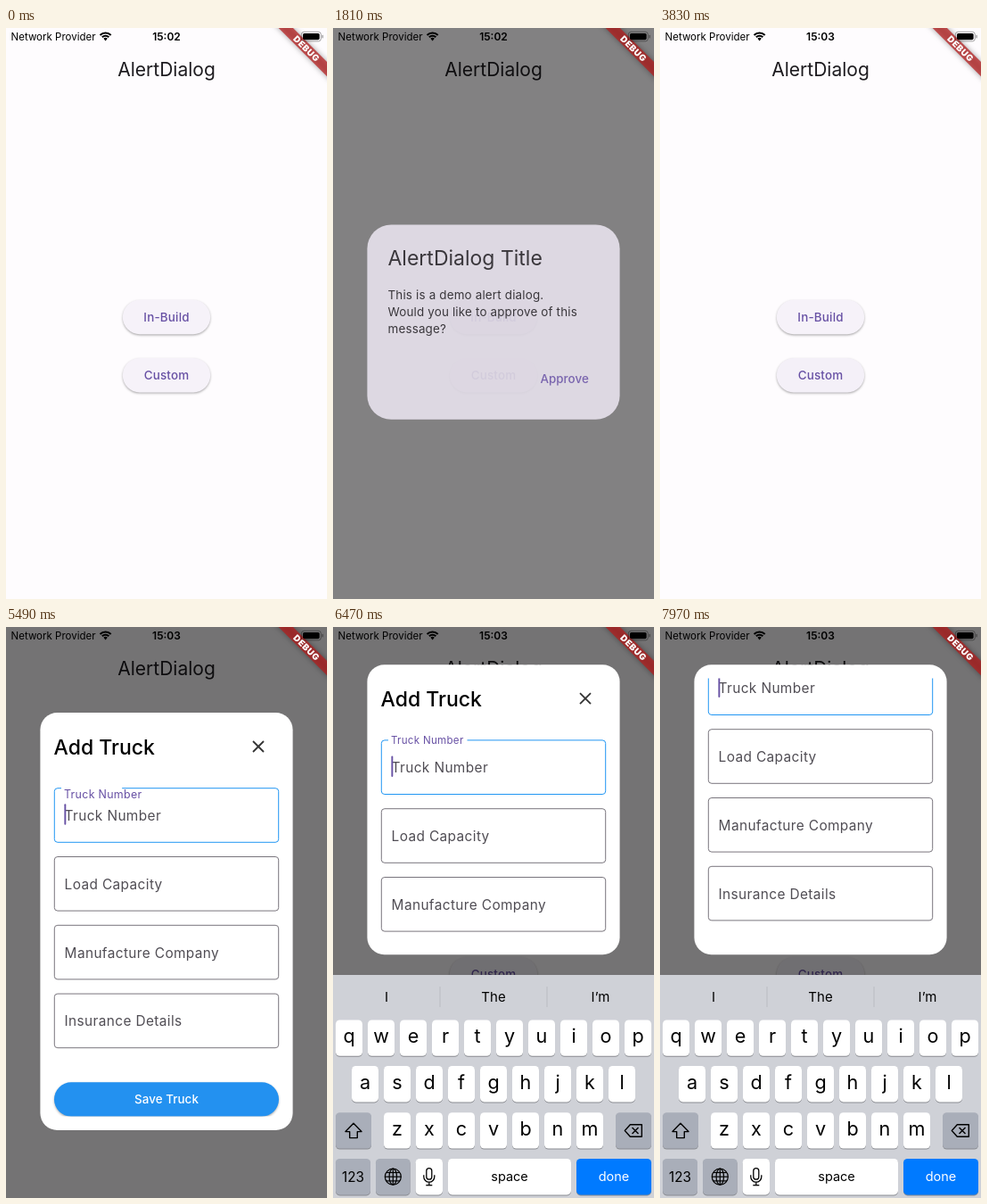
Animation of 360 by 640 pixels, one loop 8000 ms. Source, as an HTML page with a canvas:

```html
<!DOCTYPE html>
<html lang="en">
<head>
<meta charset="utf-8">
<title>Alert dialog demo</title>
<style>
  html, body { margin: 0; width: 100%; height: 100%; overflow: hidden; background: #fefcfe; }
  canvas { display: block; width: 360px; height: 640px; }
</style>
</head>
<body>
<canvas id="stage"></canvas>
<script>
const W = 360, H = 640, LOOP = 8000;
const PURPLE = '#6750a4', BLUE = '#2196f3', INK = '#1d1b1f';
const canvas = document.getElementById('stage');
const ctx = canvas.getContext('2d');
const dpr = window.devicePixelRatio || 1;
canvas.width = W * dpr;
canvas.height = H * dpr;

// ---- helpers ----
const clamp = (v, a = 0, b = 1) => Math.min(b, Math.max(a, v));
const lerp = (a, b, p) => a + (b - a) * p;
const smooth = p => p * p * (3 - 2 * p);

// Value of the last [time, value] pair that has been reached.
function hold(t, keys) {
  let v = 0;
  for (const [at, value] of keys) if (t >= at) v = value;
  return v;
}

function text(str, x, y, size, { color = INK, weight = 400, align = 'left', track = 0 } = {}) {
  ctx.font = `${weight} ${size}px Inter, Roboto, sans-serif`;
  ctx.letterSpacing = track + 'px';
  ctx.textAlign = align;
  ctx.fillStyle = color;
  ctx.fillText(str, x, y);
}

function box(x, y, w, h, r, fill) {
  ctx.beginPath();
  ctx.roundRect(x, y, w, h, r);
  ctx.fillStyle = fill;
  ctx.fill();
}

function line(points, close) {
  ctx.beginPath();
  points.forEach(([x, y], i) => i ? ctx.lineTo(x, y) : ctx.moveTo(x, y));
  if (close) ctx.closePath();
  ctx.stroke();
}

function pen(color, width) {
  ctx.strokeStyle = color;
  ctx.lineWidth = width;
}

function group(draw) {
  ctx.save();
  draw();
  ctx.restore();
}

function shadow(color, blur, dy) {
  ctx.shadowColor = color;
  ctx.shadowBlur = blur * dpr;
  ctx.shadowOffsetY = dy * dpr;
}

function pill(x, y, w, h, fill) {
  group(() => {
    shadow('rgba(0,0,0,.32)', 2.5, 1.2);
    box(x, y, w, h, h / 2, fill);
  });
}

// ---- home page ----
function homeButton(label, cy, press) {
  pill(130.8, cy - 19.2, 98.4, 38.4, '#f6f2f9');
  if (press) box(130.8, cy - 19.2, 98.4, 38.4, 19.2, `rgba(103,80,164,${press})`);
  text(label, 180, cy + 5, 13.4, { color: PURPLE, weight: 500, align: 'center', track: 0.2 });
}

function home(t) {
  ctx.fillStyle = '#fefcfe';
  ctx.fillRect(0, 0, W, H);
  text('AlertDialog', 180, 54, 21, { align: 'center' });
  homeButton('In-Build', 324, hold(t, [[1570, 0.05], [1690, 0.1], [2040, 0]]));
  homeButton('Custom', 389.2, hold(t, [[3830, 0.01], [3970, 0.1], [4190, 0]]));
}

function barrier(fade) {
  ctx.fillStyle = `rgba(0,0,0,${0.54 * Math.pow(fade, 0.6)})`;
  ctx.fillRect(0, 0, W, H);
}

// ---- built-in dialog ----
function alertDialog(fade) {
  barrier(fade);
  group(() => {
    ctx.globalAlpha = fade;
    box(38.4, 220.4, 283.2, 218.4, 26.9, '#eee8f4');
    text('AlertDialog Title', 61.5, 266.3, 23);
    ['This is a demo alert dialog.', 'Would you like to approve of this', 'message?']
      .forEach((s, i) => text(s, 61.5, 304 + i * 19.2, 13.4, { track: 0.18 }));
    text('Approve', 232.4, 398, 13.4, { color: PURPLE, weight: 500, track: 0.05 });
  });
}

// ---- custom dialog ----
function field(label, y, focused) {
  ctx.beginPath();
  ctx.roundRect(54.3, y + 0.4, 251.4, 60.6, 3.6);
  pen(focused ? BLUE : '#79757d', 1);
  ctx.stroke();
  text(label, 65.6, y + 36.6, 15.4, { color: '#504d54', track: 0.38 });
}

function floatingLabel(y, p) {
  ctx.fillStyle = '#fff';
  ctx.fillRect(62, y - 1, 88.5 * p, 3);
  text('Truck Number', 65, lerp(y + 36.6, y + 4.5, p), lerp(15.4, 11.55, p), { color: PURPLE, track: 0.3 });
}

function truckDialog(fade, lift, scroll, focus, caret) {
  barrier(fade);
  const h = lerp(468, 325, lift);
  const top = lerp(96, 42.2, lift);
  group(() => {
    ctx.globalAlpha = fade;
    box(38.4, top, 283.2, h, 19.2, '#fff');
    ctx.beginPath();
    ctx.rect(38.4, top + 15.4, 283.2, h - 30.8);
    ctx.clip();

    const y = top - scroll;
    text('Add Truck', 53.6, y + 47, 23, { color: '#000', weight: 500 });
    pen('#333', 1.8);
    line([[277, y + 32], [289, y + 44]]);
    line([[289, y + 32], [277, y + 44]]);

    ['Truck Number', 'Load Capacity', 'Manufacture Company', 'Insurance Details']
      .forEach((s, i) => field(s, y + 84.3 + i * 76.8, !i && focus));
    if (focus) floatingLabel(y + 84.3, focus);
    if (caret) box(65.4, y + 102.3, 1.9, 23.5, 1, PURPLE);

    pill(54, y + 414.3, 252, 38.4, '#2391f0');
    text('Save Truck', 180, y + 438, 13.4, { color: '#fff', weight: 500, align: 'center', track: 0.05 });
  });
}

// ---- keyboard ----
function key(x, y, w, fill = '#fff') {
  box(x, y + 1, w, 40.4, 4.6, '#8a8c91');
  box(x, y, w, 40.4, 4.6, fill);
}

function keyRow(letters, x, y) {
  [...letters].forEach((c, i) => {
    key(x + i * 36, y, 30);
    text(c, x + 15 + i * 36, y + 26, 21.6, { color: '#000', align: 'center' });
  });
}

function globe(x, y) {
  pen('#000', 1.2);
  for (const rx of [9, 4.2]) {
    ctx.beginPath();
    ctx.ellipse(x, y, rx, 9, 0, 0, 7);
    ctx.stroke();
  }
  line([[x, y - 9], [x, y + 9]]);
  line([[x - 9, y], [x + 9, y]]);
  for (const d of [-4.7, 4.7]) line([[x - 7.6, y + d], [x + 7.6, y + d]]);
}

function mic(x, y) {
  pen('#000', 1.3);
  ctx.beginPath();
  ctx.roundRect(x - 3, y - 9.5, 6, 12.5, 3);
  ctx.stroke();
  ctx.beginPath();
  ctx.moveTo(x - 6, y - 2);
  ctx.lineTo(x - 6, y);
  ctx.arc(x, y, 6, Math.PI, 0, true);
  ctx.lineTo(x + 6, y - 2);
  ctx.stroke();
  line([[x, y + 6], [x, y + 9.5]]);
  line([[x - 3.5, y + 9.5], [x + 3.5, y + 9.5]]);
}

function keyboard(top) {
  const GREY = '#a9aeb9', mid = { color: '#000', align: 'center' };
  group(() => {
    ctx.translate(0, top);
    ctx.fillStyle = '#cfd1d7';
    ctx.fillRect(0, 0, W, 250);

    ['I', 'The', 'I’m'].forEach((s, i) => text(s, 60 + i * 120, 30, 15, mid));
    ctx.fillStyle = '#b9bbc2';
    for (const x of [119.5, 239.5]) ctx.fillRect(x, 13, 1, 23);

    keyRow('qwertyuiop', 3, 50.4);
    keyRow('asdfghjkl', 21, 102);
    keyRow('zxcvbnm', 57, 154.2);

    key(3, 154.2, 40, GREY);
    key(317, 154.2, 40, GREY);
    pen('#000', 1.4);
    ctx.lineJoin = 'round';
    line([[23, 166.3], [32, 175.6], [27.3, 175.6], [27.3, 182.6], [18.7, 182.6], [18.7, 175.6], [14, 175.6]], true);
    line([[327.3, 174.5], [333.3, 167.8], [346.3, 167.8], [346.3, 181.2], [333.3, 181.2]], true);
    line([[335.5, 171], [342.5, 178]]);
    line([[342.5, 171], [335.5, 178]]);

    key(3, 206, 39, GREY);
    key(48, 206, 38.6, GREY);
    key(92.6, 206, 30.4);
    key(129, 206, 138);
    key(273, 206, 84, '#007aff');
    text('123', 22.5, 231.7, 15.3, mid);
    text('space', 198, 231, 14.5, mid);
    text('done', 315, 231, 14.5, { color: '#fff', align: 'center' });
    globe(67.3, 226.2);
    mic(107.8, 226.2);
  });
}

// ---- system overlay ----
function banner() {
  group(() => {
    ctx.translate(W, 0);
    ctx.rotate(Math.PI / 4);
    group(() => {
      shadow('rgba(0,0,0,.5)', 6, 0);
      ctx.fillStyle = 'rgba(183,28,28,.72)';
      ctx.fillRect(-45, 26.9, 90, 11.5);
    });
    text('DEBUG', 0.2, 36.2, 9.8, { color: '#fff', weight: 900, align: 'center', track: 0.5 });
  });
}

function statusBar(clock) {
  text('Network Provider', 5.6, 14, 11.5, { color: '#000' });
  text(clock, 180, 14, 12, { color: '#000', weight: 600, align: 'center' });

  pen('#000', 2);
  const a = Math.PI * 0.25;
  for (const r of [8.6, 5.3]) {
    ctx.beginPath();
    ctx.arc(111.6, 14, r, -Math.PI + a, -a);
    ctx.stroke();
  }
  ctx.beginPath();
  ctx.moveTo(111.6, 14.6);
  ctx.arc(111.6, 14, 3.1, -Math.PI + a, -a);
  ctx.closePath();
  ctx.fillStyle = '#000';
  ctx.fill();

  ctx.beginPath();
  ctx.roundRect(331.3, 4.3, 22, 10.6, 3);
  pen('rgba(0,0,0,.35)', 1);
  ctx.stroke();
  box(333, 6, 18.6, 7.2, 1.6, '#000');
  box(354.4, 7.8, 1.3, 3.6, 0.6, 'rgba(0,0,0,.4)');
}

// ---- timeline ----
// The form phase advances in even steps, like a low frame rate recording.
const FORM = 5490, STEP = 107.8;
const stepped = t => t < FORM ? t : FORM + Math.floor((t - FORM) / STEP) * STEP;

// Critically damped spring, settling in about 0.6 s.
function spring(ms) {
  if (ms <= 0) return 0;
  if (ms > 650) return 1;
  const k = ms * 0.013;
  return 1 - (1 + k) * Math.exp(-k);
}

function scrollAt(t) {
  const down = 143 * smooth(clamp((t - 6460) / 1080));
  const back = 54 * Math.pow(Math.max(0, t - 7650) / 319.4, 2);
  return down - back;
}

function render(time) {
  const t = stepped(time);
  ctx.setTransform(dpr, 0, 0, dpr, 0, 0);
  home(t);

  const alertFade = hold(t, [[1810, 0.85], [1920, 1], [3110, 0.4], [3230, 0]]);
  if (alertFade) alertDialog(alertFade);

  const formFade = hold(t, [[4080, 0.85], [4190, 1]]);
  if (formFade) {
    const focus = t < FORM ? 0 : clamp(0.77 + (t - FORM) / 167);
    const caret = t >= FORM && (t - 5450) % 1000 < 600;
    truckDialog(formFade, spring(t - 5590), scrollAt(t), focus, caret);
  }

  banner();
  const rise = spring(t - 5540);
  if (rise) keyboard(lerp(H, 390, rise));
  statusBar(t < 2040 ? '15:02' : '15:03');
}

const start = performance.now();
function tick() {
  render((performance.now() - start) % LOOP);
  requestAnimationFrame(tick);
}
tick();
</script>
</body>
</html>
```
